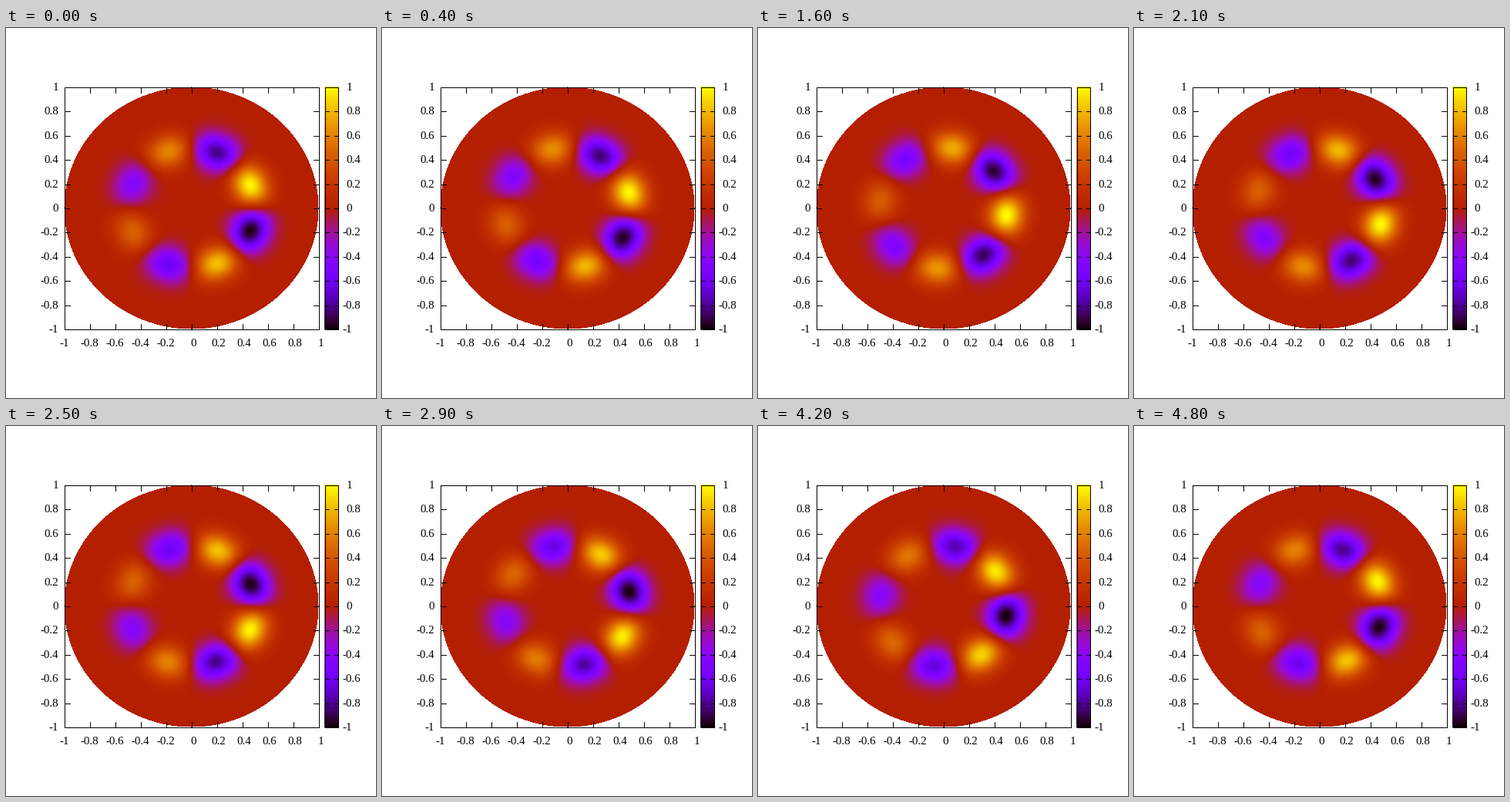
These frames come from a looping animation (480 by 480 pixels, 4900 ms). A matplotlib script:

```python
import numpy as np
import matplotlib.pyplot as plt
from matplotlib.animation import FuncAnimation

SIZE, FRAMES, STEP = 480, 49, 100
LEFT, RIGHT, TOP, BOTTOM = 75, 405, 76, 390
BAR_L, BAR_R = 413, 430
TICK = 7
MODE = 4


def palette(v):
    """Map values in -1..1 to black-violet-red-yellow RGB."""
    g = np.clip((v + 1) / 2, 0, 1)
    blue = np.clip(np.sin(2 * np.pi * g), 0, 1)
    return np.stack([np.sqrt(g), g ** 3, blue], axis=-1)


def to_px(v):
    return LEFT + (v + 1) / 2 * (RIGHT - LEFT)


def to_py(v):
    return BOTTOM - (v + 1) / 2 * (BOTTOM - TOP)


rows, cols = np.mgrid[TOP:BOTTOM + 1, LEFT:RIGHT + 1]
x = (cols - LEFT) / (RIGHT - LEFT) * 2 - 1
y = 1 - (rows - TOP) / (BOTTOM - TOP) * 2
radius, theta = np.hypot(x, y), np.arctan2(y, x)
inside = radius <= 1
envelope = np.exp(-50 * (radius - 0.5) ** 2) * (1 + 0.4 * np.cos(theta)) / 1.4

canvas = np.ones((SIZE, SIZE, 3))
ramp = palette(np.linspace(1, -1, BOTTOM - TOP + 1))
canvas[TOP:BOTTOM + 1, BAR_L:BAR_R + 1] = ramp[:, None]


def render(i):
    wave = envelope * np.sin(MODE * theta + 2 * np.pi * i / FRAMES)
    out = canvas.copy()
    out[TOP:BOTTOM + 1, LEFT:RIGHT + 1][inside] = palette(wave[inside])
    return out


fig = plt.figure(figsize=(SIZE / 100, SIZE / 100), dpi=100, facecolor="white")
ax = fig.add_axes([0, 0, 1, 1])
ax.axis("off")
picture = ax.imshow(render(0), extent=(0, SIZE, SIZE, 0),
                    interpolation="nearest", aspect="auto")
ax.set_xlim(0, SIZE)
ax.set_ylim(SIZE, 0)


def line(x0, y0, x1, y1):
    ax.plot([x0 + 0.5, x1 + 0.5], [y0 + 0.5, y1 + 0.5], color="black",
            lw=0.72, antialiased=False, solid_capstyle="projecting")


def box(x0, x1):
    line(x0, TOP, x1, TOP)
    line(x0, BOTTOM, x1, BOTTOM)
    line(x0, TOP, x0, BOTTOM)
    line(x1, TOP, x1, BOTTOM)


def label(px, py, text, align):
    ax.text(px, py, text, ha=align, va="baseline", color="black",
            family="Liberation Serif", size=10.8)


box(LEFT, RIGHT)
box(BAR_L, BAR_R)
for k in range(-5, 6):
    v = k / 5
    px, py = round(to_px(v)), round(to_py(v))
    text = f"{v:g}"
    pad = 0 if k < 0 else 1

    if abs(k) < 5:
        line(px, TOP, px, TOP + TICK)
        line(px, BOTTOM - TICK, px, BOTTOM)
        line(LEFT, py, LEFT + TICK, py)
        line(RIGHT - TICK, py, RIGHT, py)
        line(BAR_L, py, BAR_L + 5, py)
        line(BAR_R - 5, py, BAR_R, py)

    label(px + 0.5 + 2.5 * pad, 413, text, "center")
    label(68, py + 5, text, "right")
    label(436.5 + 5 * pad, py + 5, text, "left")


def update(i):
    picture.set_data(render(i))
    return [picture]


anim = FuncAnimation(fig, update, frames=FRAMES, interval=STEP,
                     repeat=True, repeat_delay=0, blit=False)
plt.show()
```
